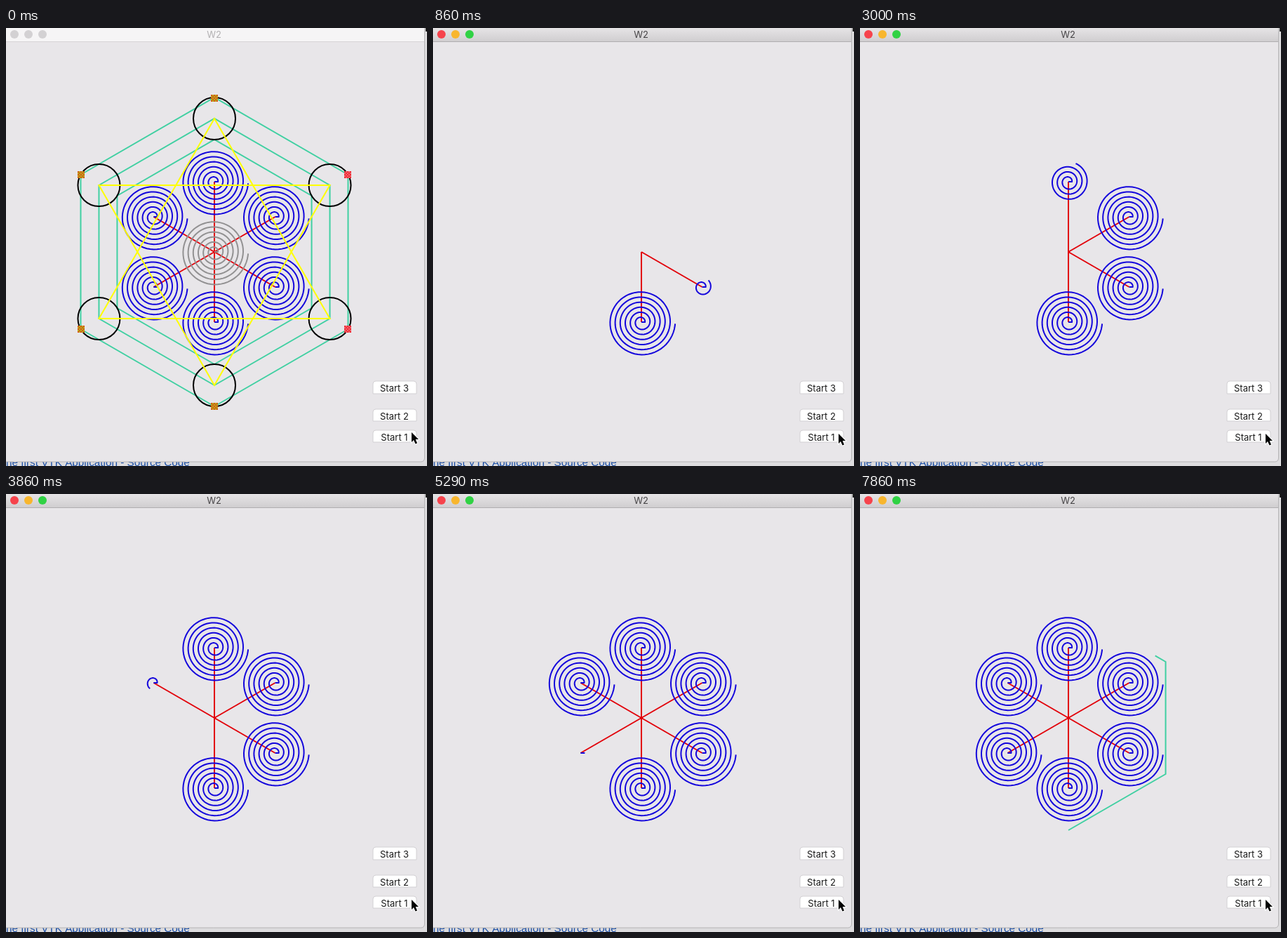
An HTML page with a canvas for the animation above (8 s loop, 600 by 624 pixels).

```html
<!DOCTYPE html>
<html lang="en">
<head>
<meta charset="utf-8">
<title>W2</title>
<style>
  html, body { margin: 0; width: 100%; height: 100%; overflow: hidden; background: #e8e6e9; }
  canvas { display: block; }
</style>
</head>
<body>
<canvas id="stage" width="600" height="624"></canvas>
<script>
const ctx = document.getElementById('stage').getContext('2d');
const LOOP = 8000, STEPS = 56;
const CX = 297, CY = 319, ARM = 100;
const TURNS = 6, LINE_WORK = 0.87, ARM_WORK = TURNS + LINE_WORK;
const RED = '#e2000a', BLUE = '#1406dc', GREEN = '#40d0a2', YELLOW = '#ffff00';
const UI_FONT = '13px Inter, Roboto, sans-serif';

// [step, work done]: one unit is a full turn of a spiral; drawing slows as the figure grows
const PACE = [[1.4, 0], [3.5, 4.5], [6, 8.87], [10, 14.1], [14, 18.53],
              [24, 27.3], [27, 29.01], [37, 35.25], [45, 40.17], [47.6, 41.22]];

function workAt(step) {
  if (step <= PACE[0][0]) return 0;
  for (let i = 1; i < PACE.length; i++) {
    const [s0, w0] = PACE[i - 1], [s1, w1] = PACE[i];
    if (step < s1) return w0 + (w1 - w0) * (step - s0) / (s1 - s0);
  }
  return 6 * ARM_WORK;
}

// Corner k of a hexagon, counted anticlockwise from the bottom
function corner(k, radius) {
  const a = (90 - 60 * k) * Math.PI / 180;
  return [CX + radius * Math.cos(a), CY + radius * Math.sin(a)];
}

function stroke(points, color, closed) {
  ctx.beginPath();
  points.forEach(([x, y]) => ctx.lineTo(x, y));
  if (closed) ctx.closePath();
  ctx.strokeStyle = color;
  ctx.lineWidth = 2;
  ctx.stroke();
}

function spiral(x, y, turns, color) {
  const end = Math.min(turns, TURNS - 0.008);
  const points = [[x, y]];
  const add = t => {
    const r = 5 + 7.2 * t, a = -2 * Math.PI * t;
    points.push([x + r * Math.cos(a), y + r * Math.sin(a)]);
  };
  for (let t = 0; t < end; t += 1 / 60) add(t);
  add(end);
  stroke(points, color);
}

function arms(work) {
  for (let k = 0; k < 6; k++) {
    const done = work - k * ARM_WORK;
    if (done <= 0) break;
    const [x, y] = corner(k, ARM);
    stroke([[CX, CY], corner(k, ARM * Math.min(1, done / LINE_WORK))], RED);
    if (done > LINE_WORK) spiral(x, y, done - LINE_WORK, BLUE);
  }
}

function hexagon(radius, length) {
  const points = [corner(0, radius)];
  for (let k = 0; k < 6 && length > 0; k++, length -= radius) {
    const part = Math.min(1, length / radius);
    const [x0, y0] = corner(k, radius), [x1, y1] = corner(k + 1, radius);
    points.push([x0 + (x1 - x0) * part, y0 + (y1 - y0) * part]);
  }
  stroke(points, GREEN);
}

function marker(k) {
  const [x, y] = corner(k, 219.5).map(v => Math.round(v) - 5);
  const right = k === 1 || k === 2;
  ctx.fillStyle = right ? '#f02a34' : '#d8501c';
  ctx.fillRect(x, y, 10, 10);
  ctx.fillStyle = right ? '#f0646c' : '#b4b414';
  for (let i = 0; i < 25; i++) {
    if (i % 2) ctx.fillRect(x + i % 5 * 2, y + Math.floor(i / 5) * 2, 2, 2);
  }
}

function fullFigure() {
  arms(6 * ARM_WORK);
  spiral(CX, CY, TURNS, '#929192');
  [160, 190, 220].forEach(r => hexagon(r, 6 * r));
  for (let k = 0; k < 6; k++) {
    ctx.beginPath();
    ctx.arc(...corner(k, 190), 30, 0, 2 * Math.PI);
    ctx.strokeStyle = '#000';
    ctx.stroke();
  }
  [0, 1].forEach(s => stroke([s, s + 2, s + 4].map(k => corner(k, 190)), YELLOW, true));
  for (let k = 0; k < 6; k++) marker(k);
}

function label(text, x, y, color) {
  ctx.font = UI_FONT;
  ctx.textAlign = 'center';
  ctx.textBaseline = 'alphabetic';
  ctx.fillStyle = color;
  ctx.fillText(text, x, y);
}

function backdrop() {
  ctx.fillStyle = '#dddcde';
  ctx.fillRect(0, 0, 600, 624);
  ctx.fillStyle = '#222';
  ctx.fillRect(598, 0, 2, 5);
  ctx.font = '15.3px "Liberation Sans", Arial, sans-serif';
  ctx.textAlign = 'left';
  ctx.textBaseline = 'alphabetic';
  ctx.fillStyle = '#1c4fa6';
  ctx.fillText('he first VTK Application - Source Code', 0, 624);
}

function windowFrame(active) {
  ctx.beginPath();
  ctx.roundRect(-10, -10, 606.5, 628, 5);
  ctx.fillStyle = '#e8e6e9';
  ctx.fill();
  ctx.strokeStyle = '#b4b3b5';
  ctx.lineWidth = 1;
  ctx.stroke();

  const bar = ctx.createLinearGradient(0, 0, 0, 19);
  bar.addColorStop(0, active ? '#e6e4e6' : '#f6f5f6');
  bar.addColorStop(1, active ? '#d0ced0' : '#f6f5f6');
  ctx.fillStyle = bar;
  ctx.fillRect(0, 0, 596, 19);
  ctx.fillStyle = active ? '#b0aeb0' : '#d6d4d6';
  ctx.fillRect(0, 19, 596, 1);

  ['#f6434c', '#f8b62e', '#30d244'].forEach((color, i) => {
    ctx.beginPath();
    ctx.arc(12 + 20 * i, 9, 6, 0, 2 * Math.PI);
    ctx.fillStyle = active ? color : '#d3d1d3';
    ctx.fill();
  });
  label('W2', 296.5, 14, active ? '#464446' : '#b2b0b2');
}

function button(text, y, height) {
  ctx.beginPath();
  ctx.roundRect(523, y, 62, height, [4, 4, 0, 0]);
  ctx.fillStyle = '#fff';
  ctx.fill();
  ctx.strokeStyle = '#d2d0d3';
  ctx.lineWidth = 1;
  ctx.stroke();
  label(text, 553.5, y + 14.5, '#1c1c1c');
}

function cursor(x, y) {
  ctx.beginPath();
  [[0, 0], [0, 14], [3, 11], [5.5, 16.5], [8, 15.5], [5.7, 10], [10, 10]]
    .forEach(([dx, dy]) => ctx.lineTo(x + dx, y + dy));
  ctx.closePath();
  ctx.strokeStyle = '#fff';
  ctx.lineWidth = 2;
  ctx.stroke();
  ctx.fillStyle = '#000';
  ctx.fill();
}

function draw(step) {
  const active = step > 0;
  backdrop();
  windowFrame(active);
  if (active) {
    arms(workAt(step));
    const drawn = 18 + (step - 48) * 45.6;
    if (drawn > 0) hexagon(160, drawn);
  } else {
    fullFigure();
  }
  button('Start 3', 503, 18);
  button('Start 2', 543, 17);
  button('Start 1', 573, 17);
  cursor(578, active ? 578 : 576);
}

function tick() {
  const t = performance.now() % LOOP;
  draw(Math.min(STEPS - 1, Math.floor((t + 4) * STEPS / LOOP)));
  requestAnimationFrame(tick);
}
tick();
</script>
</body>
</html>
```
